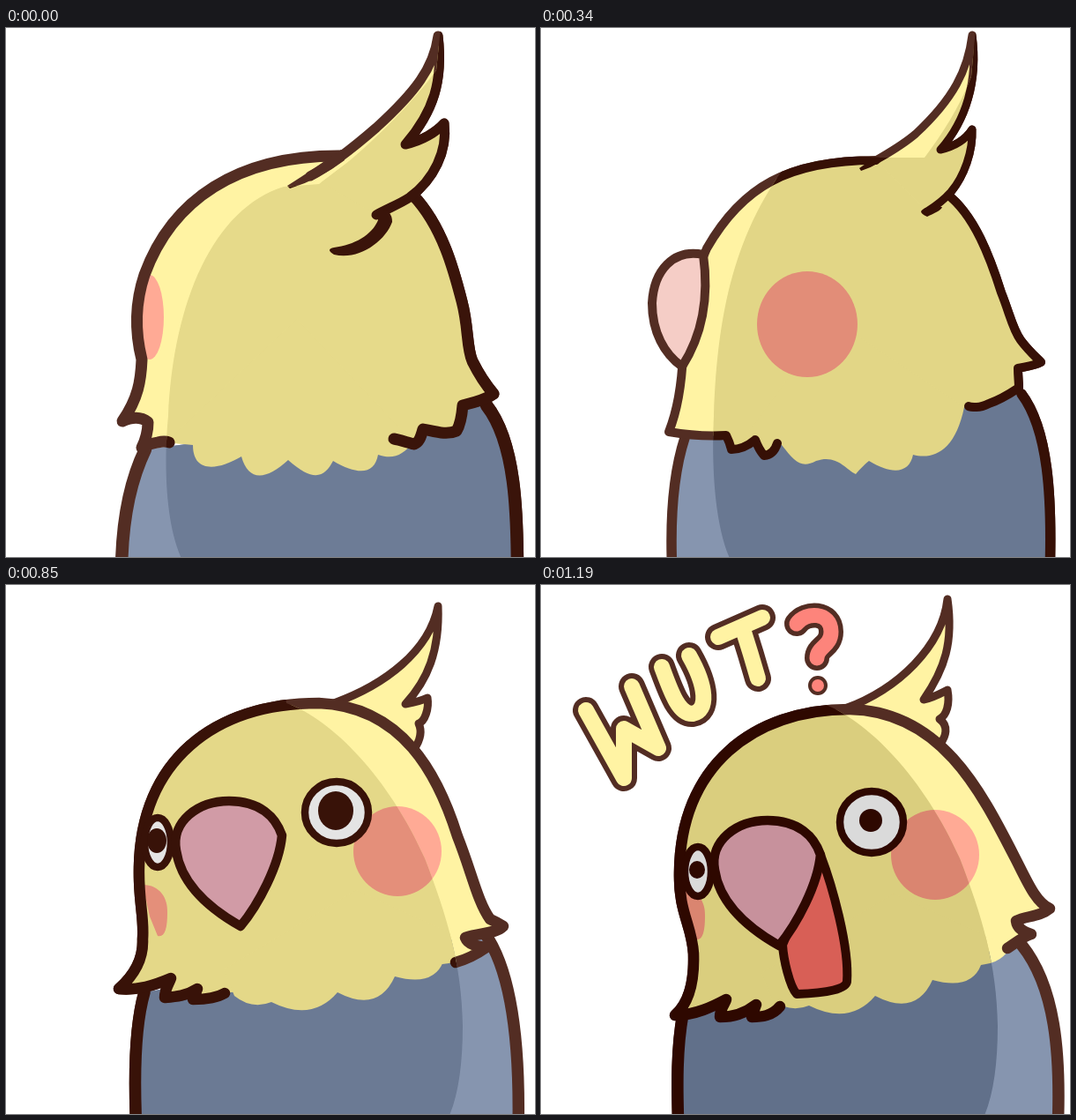
Write an HTML page with a canvas that moves like this. It is 600 by 600 pixels and loops after 2040 ms.

```html
<!DOCTYPE html>
<html lang="en">
<head>
<meta charset="utf-8">
<title>Wut bird</title>
<style>
  html, body { margin: 0; height: 100%; overflow: hidden; background: #fff; }
  canvas { display: block; width: 100vw; height: 100vh; }
</style>
</head>
<body>
<canvas id="stage" width="600" height="600"></canvas>
<script>
const ctx = document.getElementById('stage').getContext('2d');
ctx.lineCap = ctx.lineJoin = 'round';

const STEP = 170, LOOP = 2040;
const color = {
  line: [83, 45, 35], yellow: [255, 243, 163], blue: [134, 149, 175], blush: [255, 170, 149],
  beak: [236, 182, 193], paleBeak: [245, 205, 198], red: [253, 132, 123], white: [255, 255, 255]
};

// The shaded side repeats the drawing with every channel lowered by this amount.
let shade = 0;
const tone = name => `rgb(${color[name].map(v => Math.max(0, v - shade)).join()})`;

function shape(path, fill, width, line = 'line') {
  const p = typeof path === 'string' ? new Path2D(path) : path;
  if (fill) { ctx.fillStyle = tone(fill); ctx.fill(p); }
  if (width) { ctx.strokeStyle = tone(line); ctx.lineWidth = width; ctx.stroke(p); }
}

function oval(x, y, rx, ry, fill, width) {
  const p = new Path2D();
  p.ellipse(x, y, rx, ry, 0, 0, 7);
  shape(p, fill, width);
}

function at([x, y], draw) {
  ctx.save();
  ctx.translate(x, y);
  draw();
  ctx.restore();
}

function shaded(region, amount, draw) {
  shade = 0;
  draw();
  ctx.save();
  ctx.clip(new Path2D(region));
  shade = amount;
  draw();
  ctx.restore();
  shade = 0;
}

const lerp = (a, b, t) => a + (b - a) * t;

// Blends two paths that share the same commands.
function blend([from, to], t) {
  const target = to.match(/\d+/g);
  let i = 0;
  return from.replace(/\d+/g, n => lerp(+n, +target[i++], t));
}

// Seen from behind: each pair goes from fully turned away to starting to turn.
const back = {
  body: [
    'M158 478C140 515 131 560 131 620H580C580 550 578 470 545 428',
    'M163 465C150 505 146 560 149 620H577C580 530 575 455 545 415'],
  left: [
    'M185 470Q180 468 172 470Q167 471 163 472Q158 474 154 476Q161 462 161 447Q150 438 132 446C150 420 153 400 154 376C145 340 147 310 157 280C188 195 262 144 380 145',
    'M268 471Q264 484 253 485Q247 478 243 467Q230 478 216 478Q214 470 210 462Q180 464 145 458C157 428 160 395 161 370C163 330 170 290 188 250C228 180 280 150 380 150'],
  right: [
    'M462 190C495 225 508 275 517 310C525 340 522 362 529 378C538 396 547 408 553 415C543 422 530 425 518 428C517 440 514 452 511 457C500 462 488 458 473 455C470 466 468 470 463 472C455 470 446 467 440 466',
    'M460 188C492 212 510 262 522 300C532 325 535 342 544 354C553 366 560 372 567 379C560 383 550 384 541 386C541 395 542 402 542 408C530 416 520 422 508 426C502 429 498 430 494 430C490 430 487 430 485 429'],
  crest: [
    'M345 168C370 155 397 133 420 113C465 72 485 45 490 9C496 60 485 95 453 132C472 128 488 118 497 108C501 140 485 172 458 192C446 200 432 205 420 212',
    'M380 150C390 144 410 133 425 120C468 80 484 48 489 8C496 60 482 105 453 138C470 134 482 126 489 115C490 140 480 168 465 186C456 196 446 203 438 208'],
  tapers: [
    'M319 179Q352 158 380 138L384 150Q355 172 322 182ZM420 206Q438 204 438 220C430 242 400 264 372 257Q362 251 372 249C395 246 415 235 422 218Z',
    'M361 159Q375 149 385 145L385 152Q375 158 363 162ZM436 204Q448 202 455 203C454 207 446 210 438 214Q431 211 431 208C432 206 434 205 436 204Z'],
  collar: [
    'M181 470L212 473C212 505 240 502 267 486C275 515 295 513 320 490C350 517 362 508 371 491C400 508 418 506 422 484C440 490 450 484 462 470L330 330Z',
    'M230 465L273 473C288 492 295 500 312 491C335 483 345 500 357 506C362 500 368 494 372 491C400 508 418 504 422 484C445 490 470 480 480 430L330 330Z'],
  beak: [
    'M155 360C150 355 148 340 148 320C148 290 152 280 160 275C158 300 158 340 155 360Z',
    'M160 384C140 370 126 345 126 312C128 275 150 250 184 257C190 300 185 345 160 384Z'],
  shadow: [
    'M493 0L488 48C460 86 423 122 388 152L355 177L315 180C235 205 190 310 184 440C180 480 178 560 201 606H600V0Z',
    'M493 0L488 55C475 90 455 120 435 147L385 147L290 140C225 220 200 310 196 440C194 480 194 560 216 606H600V0Z']
};

function drawBack(turn, amount) {
  const part = name => blend(back[name], turn);
  const width = lerp(13, 10, turn);
  shaded(part('shadow'), amount, () => {
    shape(part('body'), 'blue', width + 1.5);
    shape(part('left') + part('right').replace('M', 'L') + 'Z', 'yellow');
    shape(part('collar'), 'yellow');
    oval(lerp(163, 302, turn), lerp(328, 336, turn), lerp(16, 57, turn), lerp(48, 60, turn), 'blush');
    shape(part('left'), null, width);
    shape(part('right'), null, width);
    shape(part('crest'), 'yellow', lerp(11, 9, turn));
    shape(part('tapers'), 'line');
    if (turn) shape(part('beak'), 'paleBeak', 10);
  });
}

const front = {
  body: 'M161 486C154 525 154 565 156 620H586C590 530 583 455 545 408',
  crest: 'M345 140C405 118 455 70 461 16C468 65 458 95 434 130C445 128 455 122 461 119C464 135 460 148 452 152C463 160 459 172 453 180',
  head: 'M271 478C262 489 250 490 239 490L244 476C230 487 215 490 203 490C203 480 210 473 210 470C195 478 175 488 152 488C168 474 174 448 173 418C171 385 156 372 157 326C158 206 240 141 350 141C455 143 500 236 540 314C553 340 562 360 577 367C565 377 550 375 539 381C540 388 545 393 556 396C548 398 538 406 529 412',
  lines: [0, 0], soft: [0, 0], beakAt: [0, 0],
  eyes: [[178, 325], [375, 269]],
  pupils: [[11, 14], [20, 22]],
  mouth: ''
};
const crouch = {
  body: 'M157 462C146 500 145 560 148 620H581C583 530 575 440 543 395',
  crest: 'M372 134C430 113 480 75 490 24C492 75 478 108 453 135Q470 132 478 128C480 140 475 155 468 157Q474 170 463 186',
  head: 'M248 463C238 469 226 470 212 470L217 458C205 466 192 467 180 468C180 458 186 450 187 446C168 454 150 460 128 458C145 443 156 425 155 402C157 375 150 360 151 320C153 200 235 134 355 134C450 138 490 215 512 285C528 325 535 360 549 379Q558 383 564 387C555 396 538 394 521 400C524 408 535 410 545 411C535 418 525 424 510 428',
  soft: [-3, -4], beakAt: [-4, -22],
  eyes: [[172, 292], [375, 258]]
};
const collar = 'M262 470Q282 486 304 477Q350 500 379 466Q425 490 444 448Q488 460 499 431Q525 428 532 410L400 350L250 440Z';
const leftBlush = 'M158 344C178 344 187 360 186 376C186 394 183 404 175 402L166 380Z';
const beak = 'M270 409C240 392 203 365 197 323C191 290 222 267 257 267C292 267 310 285 317 306C314 340 290 385 270 409Z';
const frontShadow = 'M0 0H300L318 134C370 152 435 220 475 310C500 375 517 430 518 500Q518 570 501 606H0Z';

function drawFront(amount, changes) {
  const pose = { ...front, ...changes };
  shaded(frontShadow, amount, () => {
    shape(pose.body, 'blue', 13.5);
    at(pose.lines, () => {
      shape(pose.crest, 'yellow', 9);
      shape(pose.head, 'yellow');
    });
    at(pose.soft, () => {
      shape(collar, 'yellow');
      shape(leftBlush, 'blush');
      oval(447, 306, 50, 51, 'blush');
    });
    at(pose.lines, () => {
      shape(pose.head, null, 12.5);
      pose.eyes.forEach(([x, y], i) => {
        oval(x, y, [15, 36][i], [28, 35][i], 'white', 8.5);
        oval(x - 1, y - 2, ...pose.pupils[i], 'line');
      });
    });
    at(pose.beakAt, () => {
      if (pose.mouth) shape(pose.mouth, 'red', 10);
      shape(beak, 'beak', 10.5);
    });
  });
}

function drawWhoosh() {
  const path = 'M99 331C82 341 68 355 59 376C80 384 105 381 125 378';
  shape(path, null, 15, 'blue');
  shape(path, null, 8);
}

function drawWord() {
  const letters = 'M51 142L94 219L94 163L133 185L103 115' +
    'M137 93C147 120 156 147 172 146C190 143 188 115 168 80' +
    'M201 59L251 37M229 50Q238 78 246 106';
  const mark = 'M290 44C300 30 329 30 329 53C329 70 313 70 313 83';
  shape(letters, null, 30);
  shape(letters, null, 18, 'yellow');
  shape(mark, null, 28);
  shape(mark, null, 17, 'red');
  oval(314, 114, 9, 9, 'red', 4);
}

const scenes = [
  () => drawBack(0, 25),
  () => drawBack(0.5, 27),
  () => drawBack(1, 29),
  () => { drawFront(24, { lines: [0, -6], beakAt: [2, -6] }); drawWhoosh(); },
  () => drawFront(26),
  () => drawFront(27, crouch),
  () => drawFront(34, {
    pupils: [[10, 12], [15, 16]],
    mouth: 'M317 306C322 335 328 370 329 399L268 416L272 407Z'
  }),
  () => {
    drawFront(37, {
      pupils: [[9, 10], [13, 13]],
      mouth: 'M317 306C330 340 350 410 347 450Q345 462 290 464C282 455 275 425 274 408Z'
    });
    drawWord();
  }
];

const start = performance.now();
function frame() {
  const time = (performance.now() - start) % LOOP;
  ctx.clearRect(0, 0, 600, 600);
  scenes[Math.min(Math.floor(time / STEP), scenes.length - 1)]();
  requestAnimationFrame(frame);
}
frame();
</script>
</body>
</html>
```
